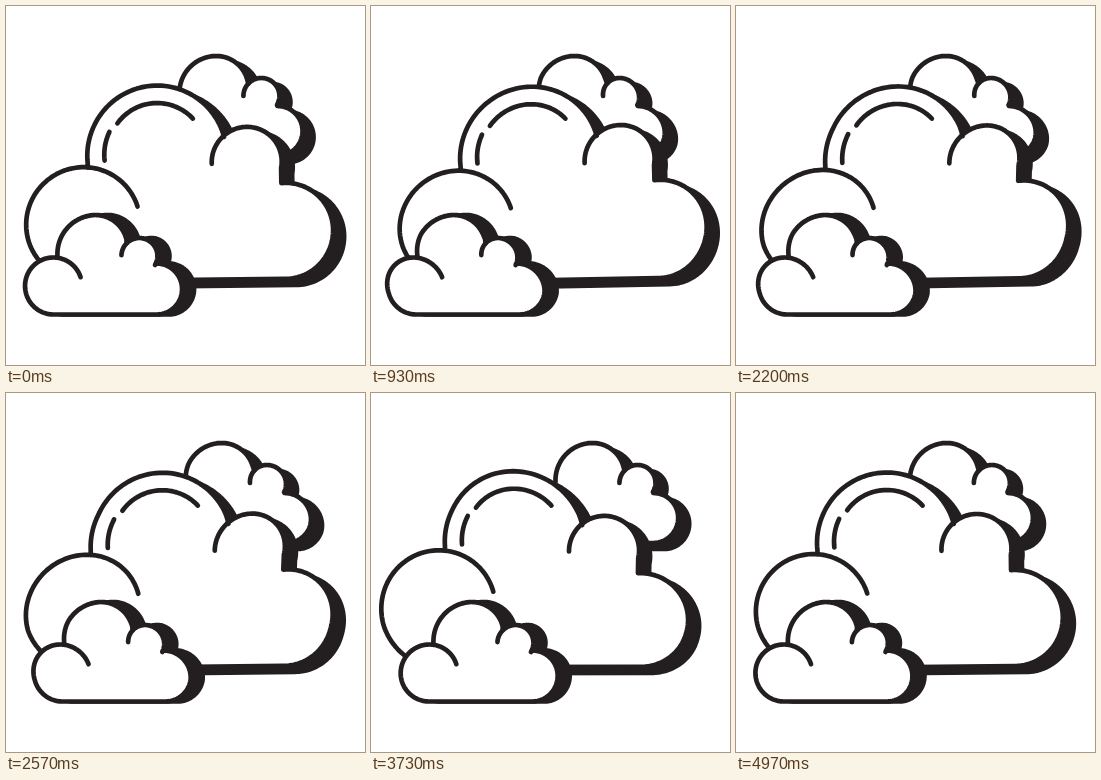
An HTML page with a canvas for the animation above (5 s loop, 359x359 px).

```html
<!DOCTYPE html>
<html lang="en">
<head>
<meta charset="utf-8">
<title>Drifting clouds</title>
<style>
html, body { margin: 0; width: 100%; height: 100%; overflow: hidden; background: #fff; }
canvas { display: block; width: 359px; height: 359px; }
</style>
</head>
<body>
<canvas id="stage"></canvas>
<script>
const SIZE = 359, LOOP = 5000, INK = '#231f20', RAD = Math.PI / 180;
const canvas = document.getElementById('stage');
const ctx = canvas.getContext('2d');
const ratio = window.devicePixelRatio || 1;
canvas.width = canvas.height = Math.round(SIZE * ratio);

// A sine with one overtone: n = 2 makes it lopsided, n = 3 flattens its ends.
function wave(time, lead, n, k) {
  const x = 2 * Math.PI * time / LOOP + lead * RAD;
  return Math.sin(x) + k * Math.sin(n * x);
}

// Sideways sway of the lower and upper part of a cloud.
const bigSway = {
  low: t => 10.4 * wave(t, 0, 2, -0.12),
  top: t => 3.3 + 8.6 * wave(t, -20, 2, -0.12)
};
const smallSway = {
  low: t => 3.6 - 7.8 * wave(t, 20, 3, 0.2),
  top: t => 1.6 - 10 * wave(t, 10, 3, 0.1)
};

// Arcs are [cx, cy, radius, start, end] in degrees.
const back = {
  sway: smallSway, base: 157, height: 107, tilt: 0, shadow: [11, 6],
  outline: [
    [200, 150, 0, 0, 0],
    [211, 87, 37, 170, 270],
    [211, 82, 32, 270, 346],
    [256, 90, 18, 224, 390],
    [272, 125, 25, 270, 450]
  ],
  lines: [[256, 90, 18, 180, 226]]
};

const main = {
  sway: bigSway, base: 281, height: 201, tilt: 0.0042, shadow: [11, 6],
  outline: [
    [77, 218, 57, 90, 274],
    [150, 149, 69.5, 173, 345],
    [240, 156, 35, 227, 370],
    [279, 225, 48, 265, 450]
  ],
  lines: [
    [77, 218, 57, 274, 342],
    [240, 156, 35, 177, 228],
    [150, 146, 49, 216, 317],
    [150, 148, 52.5, 173, 205]
  ]
};

const front = {
  sway: smallSway, base: 310, height: 102, tilt: 0, shadow: [12, 0],
  outline: [
    [48, 280, 28.5, 90, 278],
    [91, 248, 39, 180, 268],
    [90, 241, 32, 270, 346],
    [134, 250, 18, 225, 390],
    [151, 283, 25.5, 268, 450]
  ],
  lines: [[48, 280, 28.5, 278, 342], [134, 250, 18, 183, 226]]
};

const clamp = v => Math.min(1, Math.max(0, v));

// Bends a cloud: the base stays level while the lobes lean and sway.
function bend({ sway, base, height, tilt }, time) {
  const low = sway.low(time), top = sway.top(time);
  const lean = tilt * (0.6 * low + 0.4 * top);
  return (x, y) => {
    const h = Math.max(0, base - y);
    const s = clamp((h / height - 0.22) / 0.58);
    const grip = 1 - 0.88 * Math.exp(-h / 40);
    return [x + low + (top - low) * s, y - lean * (x - 185) * grip];
  };
}

function trace(arcs, warp) {
  ctx.beginPath();
  for (const [cx, cy, r, from, to] of arcs) {
    const steps = Math.max(1, Math.ceil((to - from) / 3));
    for (let i = 0; i <= steps; i++) {
      const a = (from + (to - from) * i / steps) * RAD;
      ctx.lineTo(...warp(cx + r * Math.cos(a), cy + r * Math.sin(a)));
    }
  }
}

function drawBody(cloud, warp, fill) {
  trace(cloud.outline, warp);
  ctx.closePath();
  ctx.fillStyle = fill;
  ctx.fill();
  ctx.stroke();
}

function drawCloud(cloud, time) {
  const warp = bend(cloud, time);
  ctx.save();
  ctx.translate(...cloud.shadow);
  drawBody(cloud, warp, INK);
  ctx.restore();
  drawBody(cloud, warp, '#fff');
  for (const line of cloud.lines) {
    trace([line], warp);
    ctx.stroke();
  }
}

function draw(time) {
  ctx.setTransform(ratio, 0, 0, ratio, 0, 0);
  ctx.fillStyle = '#fff';
  ctx.fillRect(0, 0, SIZE, SIZE);
  ctx.strokeStyle = INK;
  ctx.lineWidth = 4.7;
  ctx.lineCap = ctx.lineJoin = 'round';
  for (const cloud of [back, main, front]) drawCloud(cloud, time);
}

const start = performance.now();
function tick() {
  draw((performance.now() - start) % LOOP);
  requestAnimationFrame(tick);
}
tick();
</script>
</body>
</html>
```
